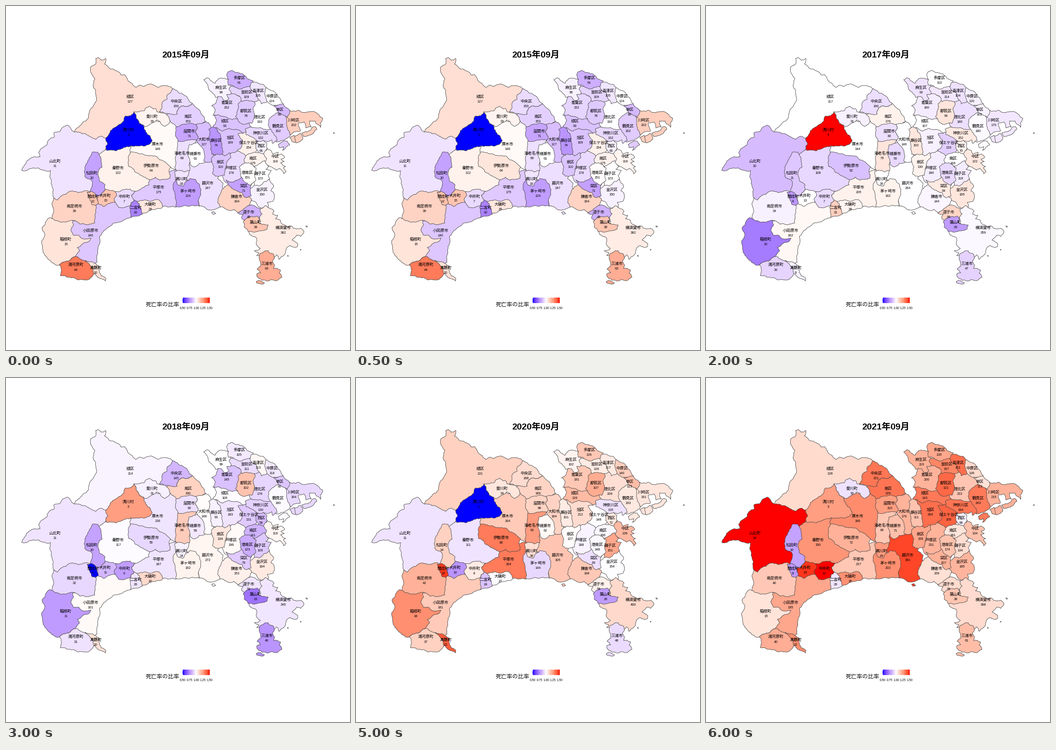
These frames come from a looping animation (748x748 px, 7 s). A matplotlib script:

```python
import math
import random

import matplotlib.pyplot as plt
import numpy as np
from matplotlib.animation import FuncAnimation

SIZE, DPI = 748, 100
CJK, LATIN = 'Noto Sans CJK JP', 'Liberation Sans'
BORDER = '#484848'
FIRST_YEAR, YEARS = 2015, 7

fig = plt.figure(figsize=(SIZE / DPI, SIZE / DPI), dpi=DPI, facecolor='white')
ax = fig.add_axes([0, 0, 1, 1])
ax.set(xlim=(0, SIZE), ylim=(SIZE, 0))
ax.axis('off')
areas = []

# Colour scale: blue - white - red, blended in CIE Lab
TO_XYZ = np.array([[.4124, .3576, .1805], [.2126, .7152, .0722], [.0193, .1192, .9505]])
WHITE_XYZ = TO_XYZ.sum(axis=1)


def to_lab(rgb):
    rgb = np.array(rgb, float)
    linear = np.where(rgb > .04045, ((rgb + .055) / 1.055) ** 2.4, rgb / 12.92)
    xyz = TO_XYZ @ linear / WHITE_XYZ
    fx, fy, fz = np.where(xyz > .008856, np.cbrt(xyz), 7.787 * xyz + 16 / 116)
    return np.array([116 * fy - 16, 500 * (fx - fy), 200 * (fy - fz)])


def to_rgb(lab):
    fy = (lab[0] + 16) / 116
    f = np.array([fy + lab[1] / 500, fy, fy - lab[2] / 200])
    xyz = np.where(f > .2069, f ** 3, (f - 16 / 116) / 7.787) * WHITE_XYZ
    linear = np.clip(np.linalg.solve(TO_XYZ, xyz), 0, 1)
    return np.clip(np.where(linear > .0031308, 1.055 * linear ** (1 / 2.4) - .055, 12.92 * linear), 0, 1)


BLUE, WHITE, RED = (to_lab(c) for c in ((0, 0, 1), (1, 1, 1), (1, 0, 0)))


def ratio_color(ratio):
    t = np.clip((ratio - 1) * 2, -1, 1)
    return to_rgb(WHITE + abs(t) * ((RED if t > 0 else BLUE) - WHITE))


def rough_edge(p, q, rng):
    """Points from p up to q, jagged by midpoint displacement."""
    dx, dy = q[0] - p[0], q[1] - p[1]
    if math.hypot(dx, dy) < 4:
        return [p]
    k = rng.uniform(-.15, .15)
    mid = ((p[0] + q[0]) / 2 - dy * k, (p[1] + q[1]) / 2 + dx * k)
    return rough_edge(p, mid, rng) + rough_edge(mid, q, rng)


def outline(flat):
    points = list(zip(flat[::2], flat[1::2]))
    path = []
    for p, q in zip(points, points[1:] + points[:1]):
        # Both neighbours of a shared edge must get the same jags
        a, b = sorted((p, q))
        edge = rough_edge(a, b, random.Random(f'{a}{b}')) + [b]
        path += (edge if a == p else edge[::-1])[:-1]
    return path


def label(x, y, text, px, family, **kw):
    return ax.text(x, y, text, fontsize=px * 72 / DPI, family=family,
                   ha='center', va='center', color='black', zorder=5, **kw)


def area(name, x, y, base, counts, *parts):
    """counts: all years but 2017, which is the mean of its neighbours."""
    counts = list(counts)
    counts.insert(2, round((counts[1] + counts[2]) / 2))
    shapes = [ax.fill(*zip(*outline(part)), ec=BORDER, lw=.65, joinstyle='round', zorder=2)[0]
              for part in parts]
    label(x, y, name, 8.6, CJK)
    areas.append((shapes, label(x, y + 11.3, '', 7.4, LATIN), base, counts))


# Later areas overlap earlier ones, so inner borders belong to the later area
area('緑区', 270, 197, 117, (127, 120, 114, 112, 131, 128),
     [148, 274, 166, 254, 174, 250, 180, 234, 190, 218, 197, 200, 195, 185, 190, 170, 193, 157,
      186, 147, 184, 133, 195, 126, 195, 114, 200, 112, 207, 118, 217, 114, 214, 126, 228, 137,
      240, 141, 250, 150, 258, 149, 264, 158, 274, 168, 282, 177, 290, 172, 300, 175, 312, 170,
      322, 172, 330, 177, 345, 173, 363, 180, 365, 195, 350, 215, 345, 240, 320, 235, 290, 240,
      275, 245, 250, 265, 225, 290, 205, 296, 180, 290, 160, 282])
area('山北町', 106, 337, 11.7, (11, 8, 11, 15, 11, 18),
     [34, 357, 44, 340, 50, 333, 74, 328, 71, 318, 80, 308, 90, 300, 94, 290, 105, 285, 104, 276,
      117, 273, 124, 263, 133, 259, 141, 266, 148, 274, 165, 278, 183, 284, 195, 290, 208, 283,
      217, 287, 225, 300, 220, 308, 210, 325, 200, 340, 195, 380, 195, 405, 170, 408, 150, 412,
      130, 418, 112, 426, 104, 417, 103, 400, 98, 385, 95, 372, 97, 358, 80, 357, 60, 352, 45, 358])
area('厚木市', 330, 300, 144, (146, 153, 136, 142, 164, 186),
     [295, 250, 320, 245, 345, 252, 365, 250, 380, 258, 382, 300, 376, 340, 368, 356, 345, 350,
      310, 335, 280, 330, 262, 315, 275, 300, 300, 290, 296, 270])
area('秦野市', 244, 352, 118, (122, 98, 117, 146, 111, 150),
     [205, 320, 218, 310, 240, 305, 265, 300, 272, 306, 270, 318, 280, 340, 310, 365, 318, 376,
      318, 392, 285, 408, 265, 405, 240, 408, 215, 405, 205, 395, 195, 370, 200, 350, 195, 330])
area('小田原市', 184, 488, 159, (140, 162, 161, 171, 181, 195),
     [140, 470, 165, 468, 188, 465, 188, 440, 200, 428, 215, 428, 230, 420, 245, 430, 262, 430,
      275, 435, 271, 460, 258, 464, 245, 470, 225, 480, 210, 492, 203, 502, 204, 515, 199, 530,
      197, 545, 198, 557, 190, 562, 170, 556, 150, 550, 140, 530, 135, 500])
area('南足柄市', 149, 435, 35, (39, 36, 32, 33, 42, 40),
     [104, 417, 112, 422, 120, 413, 130, 410, 145, 402, 158, 406, 170, 402, 180, 403, 190, 420,
      196, 434, 195, 445, 194, 460, 193, 472, 182, 474, 160, 474, 146, 466, 130, 475, 118, 474,
      100, 462, 104, 448, 101, 436])
area('箱根町', 130, 507, 14, (15, 10, 11, 17, 18, 15),
     [96, 460, 108, 467, 118, 470, 130, 470, 145, 466, 147, 476, 141, 486, 146, 498, 160, 500,
      166, 506, 185, 505, 180, 512, 165, 518, 155, 525, 160, 532, 150, 545, 135, 555, 116, 563,
      100, 558, 88, 545, 80, 530, 78, 510, 84, 500, 78, 483, 86, 470])
area('湯河原町', 152, 563, 33, (44, 30, 31, 33, 37, 40),
     [116, 563, 135, 555, 150, 545, 157, 546, 165, 552, 180, 556, 186, 565, 190, 573, 193, 580,
      187, 589, 175, 596, 160, 595, 150, 592, 135, 590, 118, 586, 121, 575])
area('真鶴町', 195, 569, 9.3, (10, 8, 10, 10, 13, 12),
     [172, 553, 185, 556, 196, 561, 203, 568, 203, 580, 207, 587, 217, 592, 216, 598, 208, 593,
      198, 588, 190, 580, 187, 568, 180, 560])
area('松田町', 187, 363, 12.5, (10, 12, 10, 20, 14, 10),
     [188, 318, 200, 318, 207, 335, 209, 350, 200, 365, 203, 380, 215, 388, 216, 399, 207, 411,
      197, 414, 182, 404, 186, 395, 186, 379, 178, 376, 171, 370, 170, 360, 173, 347, 178, 336,
      184, 327])
area('大井町', 216, 412, 13, (15, 15, 11, 15, 10, 19),
     [197, 414, 207, 411, 216, 399, 225, 401, 232, 401, 240, 404, 243, 412, 236, 420, 237, 427,
      222, 430, 212, 436, 200, 430])
area('開成町', 189, 414, 10.3, (12, 10, 5, 12, 15, 8),
     [176, 405, 186, 403, 197, 414, 201, 428, 195, 434, 187, 432, 182, 420])
area('平塚市', 332, 394, 198, (175, 223, 187, 206, 264, 227),
     [273, 411, 281, 403, 295, 397, 311, 389, 312, 378, 315, 365, 350, 362, 360, 358, 372, 358,
      378, 370, 378, 425, 370, 437, 355, 437, 341, 436, 325, 438, 300, 432, 286, 432, 275, 422])
area('中井町', 257, 414, 7.6, (7, 8, 6, 12, 8, 12),
     [238, 404, 250, 402, 262, 398, 270, 398, 281, 403, 273, 411, 279, 422, 272, 428, 270, 434,
      258, 438, 245, 438, 240, 430, 235, 420, 241, 412])
area('大磯町', 314, 431, 27.3, (29, 27, 30, 27, 27, 35),
     [285, 425, 300, 422, 318, 424, 330, 421, 338, 428, 341, 437, 325, 442, 310, 446, 296, 452,
      290, 440])
area('二宮町', 282, 438, 27.5, (20, 36, 26, 27, 24, 26),
     [272, 428, 279, 422, 285, 425, 290, 430, 293, 440, 296, 453, 283, 457, 271, 460, 270, 448,
      269, 438])
area('伊勢原市', 316, 347, 60, (64, 49, 55, 66, 80, 72),
     [270, 318, 285, 319, 298, 322, 312, 326, 322, 326, 335, 335, 350, 343, 358, 350, 355, 362,
      357, 374, 345, 377, 335, 379, 325, 372, 312, 378, 300, 372, 288, 364, 275, 353, 266, 348,
      267, 335])
area('清川村', 266, 269, 2.4, (1, 4, 3, 2, 1, 3),
     [278, 230, 284, 245, 290, 255, 299, 259, 304, 274, 313, 282, 318, 292, 313, 300, 300, 305,
      282, 304, 262, 306, 240, 315, 228, 313, 219, 314, 217, 308, 221, 300, 217, 287, 225, 277,
      243, 260, 256, 250, 260, 239, 272, 238])
area('南区', 396, 240, 170, (153, 162, 190, 181, 189, 229),
     [372, 235, 375, 222, 386, 217, 397, 218, 405, 212, 415, 222, 428, 238, 434, 251, 425, 258,
      412, 264, 400, 262, 385, 264, 370, 263, 357, 250, 345, 240, 360, 230])
area('中央区', 370, 207, 172, (159, 174, 145, 203, 188, 231),
     [363, 180, 372, 184, 385, 192, 395, 201, 405, 212, 397, 218, 386, 217, 375, 222, 372, 235,
      355, 234, 347, 234, 333, 231, 339, 222, 341, 208, 350, 203, 352, 192])
area('愛川町', 318, 240, 32, (33, 31, 31, 35, 34, 30),
     [278, 230, 288, 230, 300, 228, 305, 221, 312, 218, 320, 224, 325, 223, 328, 230, 333, 231,
      345, 233, 353, 240, 357, 250, 345, 262, 335, 251, 327, 248, 315, 256, 302, 262, 299, 259,
      290, 255, 284, 245])
area('藤沢市', 439, 385, 265, (247, 256, 272, 292, 305, 381),
     [392, 355, 400, 340, 420, 335, 440, 330, 455, 345, 460, 360, 460, 375, 472, 385, 472, 400,
      468, 420, 466, 437, 455, 442, 446, 444, 435, 440, 420, 435, 415, 415, 415, 390, 400, 380,
      388, 375], [447, 449, 452, 447, 456, 451, 450, 453])
area('海老名市', 383, 320, 74, (69, 74, 84, 71, 93, 85),
     [375, 290, 390, 290, 405, 288, 415, 290, 412, 302, 400, 305, 402, 330, 398, 345, 399, 358,
      385, 362, 372, 360, 367, 350, 369, 338, 370, 325, 372, 310])
area('綾瀬市', 412, 321, 61, (61, 55, 58, 58, 62, 71),
     [398, 302, 408, 299, 418, 297, 430, 308, 436, 325, 433, 340, 420, 342, 410, 350, 400, 345,
      398, 330, 396, 315])
area('大和市', 431, 290, 147, (127, 143, 148, 176, 164, 176),
     [413, 258, 425, 256, 434, 251, 441, 254, 446, 262, 449, 285, 450, 300, 452, 325, 448, 337,
      440, 340, 430, 337, 432, 325, 428, 310, 418, 299, 415, 290, 418, 284, 412, 275, 416, 265])
area('座間市', 399, 272, 88, (71, 81, 82, 96, 98, 110),
     [370, 263, 386, 257, 400, 255, 413, 258, 416, 265, 412, 275, 418, 284, 415, 292, 405, 290,
      390, 293, 375, 294])
area('寒川町', 382, 376, 35, (33, 36, 34, 40, 38, 44),
     [367, 360, 375, 357, 388, 361, 399, 358, 395, 370, 394, 382, 385, 394, 372, 390, 369, 376])
area('茅ヶ崎市', 396, 402, 157, (124, 163, 162, 169, 144, 202),
     [369, 376, 372, 387, 385, 392, 394, 380, 400, 375, 412, 377, 420, 387, 424, 400, 421, 415,
      420, 435, 405, 433, 390, 434, 378, 437, 370, 437])

area('青葉区', 480, 210, 167, (152, 174, 145, 177, 191, 200),
     [447, 217, 457, 210, 460, 195, 480, 188, 495, 188, 510, 198, 515, 210, 510, 225, 505, 245,
      495, 252, 470, 246, 450, 237, 455, 225])
area('緑区', 476, 250, 107, (93, 108, 106, 114, 126, 143),
     [450, 262, 458, 249, 453, 237, 470, 240, 485, 245, 500, 245, 515, 250, 535, 252, 535, 265,
      522, 275, 508, 277, 500, 274, 485, 270, 470, 276, 458, 268])
area('旭区', 488, 286, 194, (169, 194, 183, 223, 212, 264),
     [456, 264, 470, 272, 485, 266, 500, 268, 510, 272, 522, 290, 520, 312, 505, 320, 490, 325,
      475, 330, 465, 318, 465, 300, 460, 280])
area('瀬谷区', 457, 292, 96, (74, 110, 93, 94, 101, 111),
     [441, 268, 450, 262, 458, 266, 466, 280, 470, 300, 472, 318, 465, 328, 458, 324, 447, 322,
      445, 300, 441, 285])
area('戸塚区', 490, 352, 193, (178, 176, 196, 197, 188, 231),
     [472, 335, 490, 320, 505, 314, 515, 315, 528, 328, 525, 345, 516, 355, 517, 372, 505, 385,
      495, 388, 478, 384, 470, 368, 470, 355])
area('泉区', 466, 339, 126, (110, 125, 134, 139, 127, 155),
     [447, 330, 458, 322, 475, 326, 487, 319, 489, 330, 480, 340, 476, 355, 475, 368, 462, 371,
      450, 366, 452, 350, 447, 340])
area('港北区', 552, 241, 193, (192, 185, 176, 197, 209, 222),
     [530, 210, 549, 200, 555, 208, 570, 208, 585, 215, 596, 232, 582, 243, 578, 257, 580, 275,
      560, 273, 545, 270, 532, 262, 530, 240])
area('都筑区', 522, 228, 88, (78, 85, 102, 81, 107, 121),
     [505, 212, 520, 203, 535, 203, 542, 212, 537, 225, 540, 240, 535, 255, 520, 257, 505, 250,
      499, 240, 503, 228])
area('麻生区', 468, 177, 99, (96, 87, 99, 113, 102, 119),
     [430, 160, 437, 156, 446, 163, 455, 168, 462, 158, 475, 157, 487, 163, 487, 172, 492, 180,
      488, 192, 480, 192, 485, 202, 475, 206, 468, 197, 456, 199, 450, 190, 440, 178, 436, 168])
area('宮前区', 523, 187, 120, (109, 116, 111, 143, 126, 157),
     [485, 180, 490, 174, 505, 176, 520, 174, 535, 170, 542, 185, 552, 192, 552, 203, 540, 208,
      525, 205, 513, 208, 505, 195, 490, 191])
area('多摩区', 507, 156, 110, (91, 114, 105, 117, 126, 135),
     [480, 151, 483, 143, 490, 140, 505, 145, 520, 152, 530, 160, 538, 163, 533, 174, 520, 177,
      505, 180, 495, 174, 483, 172, 484, 160])
area('高津区', 548, 184, 111, (105, 96, 113, 116, 117, 151),
     [533, 167, 545, 166, 558, 170, 566, 178, 568, 190, 574, 205, 565, 210, 555, 213, 549, 203,
      545, 190, 536, 185, 530, 176])
area('中原区', 578, 196, 124, (124, 122, 118, 137, 140, 136),
     [565, 178, 575, 183, 588, 192, 597, 203, 603, 213, 593, 217, 580, 216, 570, 210, 565, 200,
      562, 190])
area('鶴見区', 592, 261, 182, (162, 180, 180, 192, 193, 243),
     [575, 243, 585, 235, 593, 230, 604, 234, 614, 243, 614, 255, 618, 270, 618, 282, 607, 290,
      596, 294, 588, 296, 580, 280, 575, 268, 570, 257],
     [592, 301, 612, 294, 617, 302, 601, 314, 604, 306, 594, 308])
area('川崎区', 626, 248, 179, (202, 177, 164, 168, 191, 215),
     [608, 240, 612, 224, 622, 229, 638, 227, 652, 232, 668, 229, 680, 236, 689, 245, 684, 264,
      676, 257, 672, 250, 660, 250, 664, 263, 652, 265, 648, 252, 636, 254, 640, 272, 626, 274,
      618, 280, 612, 268, 610, 255],
     [617, 286, 626, 281, 631, 296, 622, 295], [628, 283, 640, 277, 645, 290, 632, 298],
     [643, 276, 672, 262, 676, 268, 648, 284], [712, 275, 714, 276, 713, 278])
area('幸区', 595, 225, 105, (89, 113, 92, 121, 123, 113),
     [582, 217, 593, 215, 603, 213, 612, 222, 617, 232, 612, 243, 602, 237, 593, 232])
area('保土ケ谷区', 528, 297, 148, (154, 135, 131, 172, 148, 205),
     [505, 277, 522, 274, 538, 282, 550, 295, 548, 310, 540, 322, 525, 328, 510, 318, 503, 313,
      513, 305, 515, 292])
area('神奈川区', 554, 276, 144, (132, 173, 130, 145, 135, 194),
     [520, 268, 533, 263, 545, 265, 560, 268, 575, 268, 583, 280, 590, 292, 580, 299, 578, 291,
      570, 295, 560, 294, 548, 297, 535, 285, 522, 280])
area('西区', 555, 304, 68, (66, 83, 58, 66, 72, 66),
     [545, 295, 560, 292, 567, 298, 568, 310, 562, 322, 550, 324, 543, 310])
area('中区', 585, 327, 115, (118, 125, 118, 96, 136, 134),
     [558, 324, 568, 310, 577, 315, 580, 322, 592, 318, 590, 326, 599, 322, 606, 329, 598, 333,
      605, 338, 597, 341, 608, 349, 603, 352, 609, 360, 604, 365, 595, 353, 588, 357, 578, 350,
      570, 347, 560, 342])
area('南区', 537, 331, 169, (175, 197, 141, 170, 166, 181),
     [522, 325, 535, 320, 548, 319, 560, 322, 567, 332, 560, 344, 545, 350, 530, 346, 519, 340])
area('磯子区', 553, 364, 123, (123, 126, 109, 133, 151, 134),
     [541, 348, 553, 342, 562, 336, 572, 348, 565, 355, 577, 358, 570, 368, 573, 378, 565, 388,
      555, 398, 540, 394, 538, 380, 536, 365])
area('金沢区', 557, 399, 155, (150, 166, 164, 139, 154, 185),
     [528, 398, 540, 390, 552, 391, 560, 383, 572, 376, 582, 390, 576, 402, 583, 408, 580, 425,
      568, 427, 570, 438, 555, 440, 545, 430, 530, 420])
area('鎌倉市', 502, 414, 147, (164, 135, 153, 141, 168, 159),
     [468, 404, 475, 393, 485, 385, 500, 395, 515, 400, 525, 410, 534, 420, 530, 432, 522, 442,
      510, 447, 504, 450, 496, 442, 486, 445, 478, 441, 466, 437, 460, 427])
area('栄区', 517, 391, 89, (71, 110, 79, 93, 83, 107),
     [478, 378, 495, 383, 505, 378, 512, 370, 525, 378, 535, 386, 531, 400, 533, 413, 522, 417,
      512, 405, 497, 400, 485, 391])
area('港南区', 525, 362, 150, (151, 153, 123, 180, 148, 174),
     [507, 350, 520, 341, 535, 344, 544, 352, 540, 365, 543, 380, 532, 390, 518, 382, 510, 370])
area('横須賀市', 603, 482, 364, (382, 373, 345, 372, 400, 398),
     [550, 442, 565, 434, 575, 441, 583, 446, 580, 453, 591, 455, 586, 463, 597, 466, 601, 475,
      612, 481, 620, 478, 632, 485, 641, 483, 648, 491, 641, 501, 632, 498, 622, 509, 634, 516,
      633, 524, 618, 521, 609, 530, 605, 541, 594, 551, 588, 541, 582, 548, 570, 545, 556, 543,
      545, 543, 550, 537, 540, 532, 553, 527, 544, 517, 545, 505, 535, 500, 527, 485, 540, 470,
      553, 465],
     [652, 478, 656, 480, 653, 481], [612, 542, 614, 543, 613, 545], [640, 529, 642, 530, 640, 531])
area('逗子市', 528, 448, 54, (45, 69, 51, 59, 56, 59),
     [504, 450, 518, 440, 527, 434, 540, 434, 552, 440, 557, 452, 549, 462, 540, 463, 530, 465,
      520, 470, 512, 461, 516, 453])
area('葉山町', 543, 470, 33, (38, 29, 23, 41, 26, 38),
     [516, 468, 522, 462, 531, 458, 540, 459, 547, 457, 551, 464, 549, 470, 558, 475, 570, 476,
      568, 485, 555, 489, 540, 492, 526, 490, 518, 481])
area('三浦市', 567, 560, 52, (63, 54, 40, 48, 48, 61),
     [553, 538, 560, 535, 570, 532, 582, 540, 584, 548, 579, 555, 584, 563, 582, 571, 597, 574,
      594, 581, 600, 590, 590, 597, 577, 595, 567, 598, 550, 593, 545, 583, 554, 580, 546, 573,
      554, 566, 551, 552],
     [544, 599, 553, 597, 562, 602, 556, 605, 546, 603])

title = label(391, 107, '', 19.4, [LATIN, CJK], weight='bold')

# Legend
label(340, 649, '死亡率の比率', 12.2, CJK)
ramp = np.array([[ratio_color(r) for r in np.linspace(.5, 1.5, 60)]])
ax.imshow(ramp, extent=(384, 443, 646, 634), aspect='auto', interpolation='bilinear')
for i in range(5):
    x = 384 + 14.75 * i
    label(x, 657.5, f'{.5 + .25 * i:.2f}', 6.6, LATIN)
    for y in (634, 643.6):
        ax.plot([x, x], [y, y + 2.4], color='white', lw=.5, zorder=4)
ax.set(xlim=(0, SIZE), ylim=(SIZE, 0))


def draw(i):
    title.set_text(f'{FIRST_YEAR + i}年09月')
    for shapes, count, base, counts in areas:
        color = ratio_color(counts[i] / base)
        for shape in shapes:
            shape.set_facecolor(color)
        count.set_text(str(counts[i]))
    return []


anim = FuncAnimation(fig, draw, frames=YEARS, interval=1000, repeat=True, repeat_delay=0)
plt.show()
```
